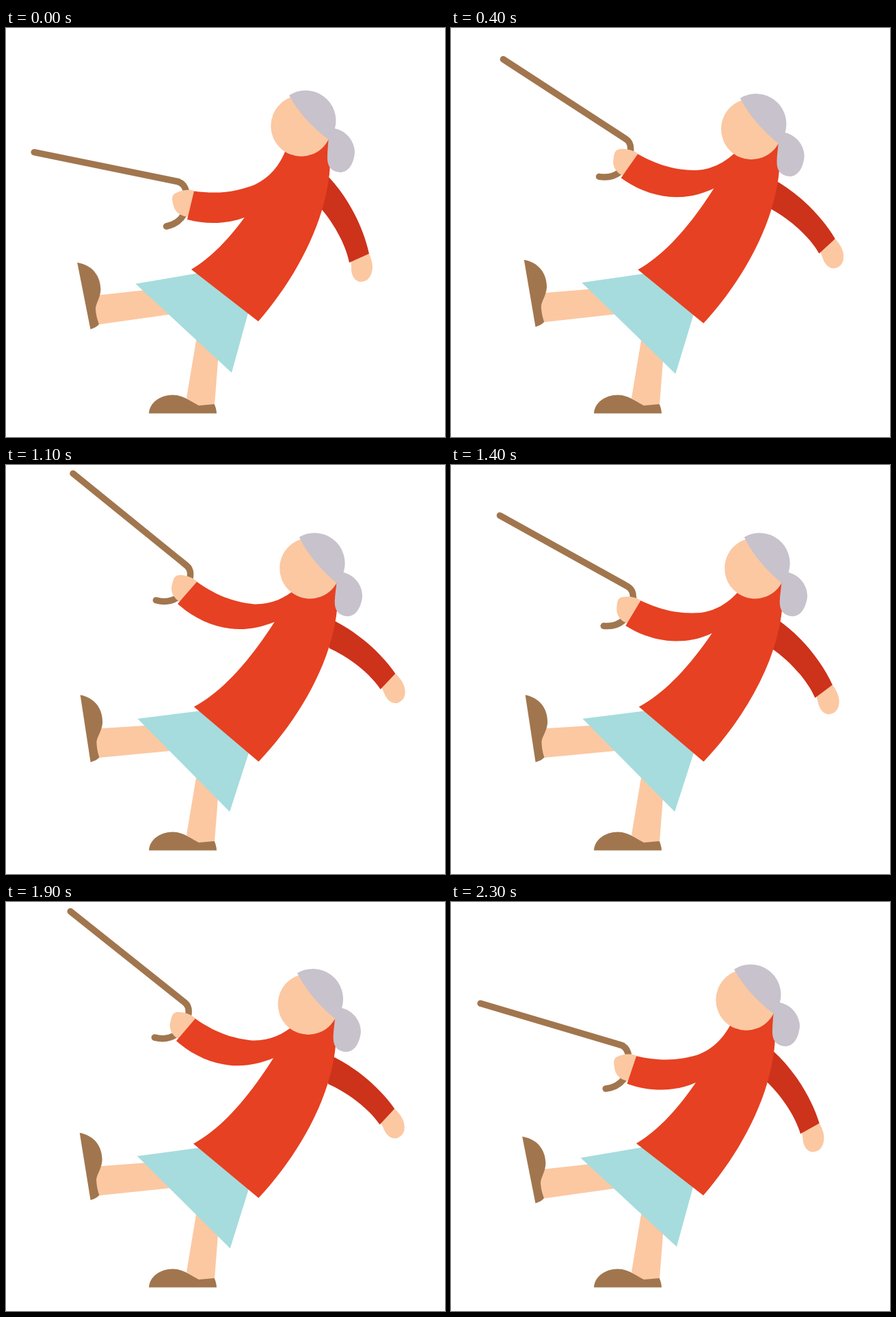
Write an HTML page that moves like this. It is 642 by 598 pixels and loops after 2400 ms.

```html
<!DOCTYPE html>
<html lang="en">
<head>
<meta charset="utf-8">
<title>Waving cane</title>
<style>
  html, body { margin: 0; width: 100%; height: 100%; overflow: hidden; background: #fff; }
  svg { display: block; width: 642px; height: 598px; }
  .skin { fill: #fbc8a2; }
  .red { fill: #e64122; }
  .dark { fill: #cd321b; }
  .brown { fill: #a1764e; }
  .hair { fill: #c8c2cc; }
  .skirt { fill: #a6dcdd; }
  .cane { fill: none; stroke: #a1764e; stroke-width: 9.5; stroke-linecap: round; }
</style>
</head>
<body>
<svg viewBox="0 0 642 598">
  <!-- standing leg -->
  <path class="skin" d="M281.7 435L264 541L282 554L305 551L313.6 440Z"/>
  <path class="brown" d="M209 563.5C210 548 225 536.5 244 536.5C259 536.5 271 546 282 552L304.5 550C306 552 308 559 308 563.5Z"/>

  <g id="body">
    <!-- raised leg -->
    <path class="skin" d="M130 391.2L205 383L242 418.6L130 434.2Z"/>
    <path class="brown" d="M104.2 343C125 346 138 361 138.5 382C138 395 131 403 131 411C132 422 134 427 136 433C133 437 128 439 123.5 440.5Z"/>
    <path class="skirt" d="M189.5 374L290 356.9L357 406L330 504Z"/>

    <g id="backArm">
      <path class="skin" d="M531 330C536 341 537 350 535 357C532 368 525 371 519 371C512 371 506 365 505 354L504.5 340Z"/>
      <path class="dark" d="M473 219C501 249 523 292 531 330L502 343C497 316 477 281 456 259L460 215Z"/>
    </g>

    <path class="red" d="M271 353C310 330 347 286 384 223L410 185L430 150L473 160L474 200C470 280 424 366 369 429Z"/>

    <g id="frontArm">
      <path class="cane" d="M41.2 181.7L251 224.5C258 226 262 232 264 240C269 266 258 285 234.5 290"/>
      <path class="skin" d="M275.5 238C265 235 254 238 247 242C241 246 243 252 245 260C247 269 256 276 267 276Z"/>
      <path class="red" d="M275 238.5C315 244 341 238 364 229C387 218 400 200 408 181L430 175L440 215L403 238C388 255 371 269 349 277C325 286 295 288 265 280Z"/>
    </g>

    <circle class="skin" cx="431.8" cy="143.2" r="44.5"/>
    <path class="hair" d="M414 98.5A44.3 44.3 0 0 1 481 147C497 150 510 165 510 182C508 203 498 211 489 211C475 210 470 202 470 189C470 180 471 172 471.5 163C449 146 428 124 414 98.5Z"/>
  </g>
</svg>
<script>
  const STEP = 100, STEPS = 24;
  // [step, value] keys, linear in between
  const lean = [[0, 0], [1, 0], [6, 1], [18, 1], [23, 0], [24, 0]];
  const swing = [[0, 0], [5, 1], [8, .4], [11, 1], [12, 1], [15, .4], [18, 1], [19, 1], [24, 0]];

  function valueAt(keys, s) {
    const i = keys.findIndex(k => k[0] > s);
    const [s0, v0] = keys[i - 1], [s1, v1] = keys[i];
    return v0 + (v1 - v0) * (s - s0) / (s1 - s0);
  }

  function turn(id, angle, x, y) {
    document.getElementById(id).setAttribute('transform', `rotate(${angle} ${x} ${y})`);
  }

  const start = performance.now();

  function draw() {
    const s = Math.floor((performance.now() - start) / STEP) % STEPS;
    const arm = 25 * valueAt(swing, s);
    turn('body', 2.5 * valueAt(lean, s), 260, 441);
    turn('frontArm', arm, 425.3, 187);
    turn('backArm', -arm, 460.4, 238.2);
    requestAnimationFrame(draw);
  }
  draw();
</script>
</body>
</html>
```
